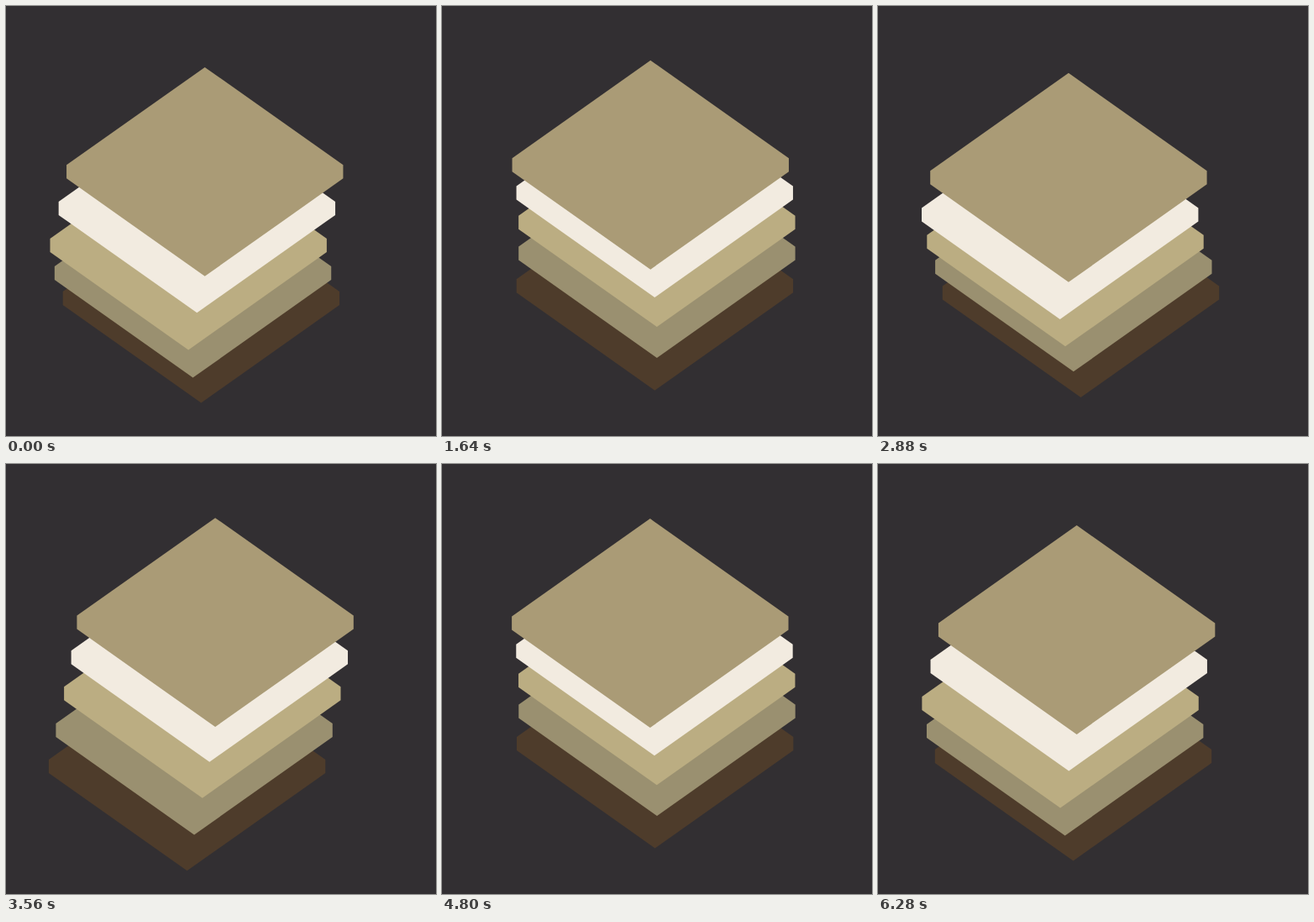
An HTML page that plays this animation: 512x512 px, repeating every 6320 ms.

```html
<!DOCTYPE html>
<html lang="en">
<head>
<meta charset="utf-8">
<title>Floating layers</title>
<style>
  html, body { margin: 0; width: 100%; height: 100%; overflow: hidden; background: #322f32; }
  svg { display: block; width: 100%; height: 100%; }
</style>
</head>
<body>
<svg id="stage" viewBox="0 0 512 512"></svg>
<script>
  const LOOP = 6320, STEP = 40;
  const SLOPE = Math.SQRT1_2;
  const HALF_WIDTH = 164.7, THICKNESS = 16;
  const REST = { x: 214.7, y: 337.4 }, GAP = 36.9, TRAVEL = 41.5;
  const PHASE = 0.56, LAG = 0.25;
  const COLORS = ['#aa9b76', '#f2ebe0', '#bbad82', '#9a9070', '#4e3c2b'];

  const stage = document.getElementById('stage');

  // Every plate is a hexagon whose lowest corner sits at the group's origin.
  const rise = HALF_WIDTH * SLOPE;
  const outline = [
    [0, 0],
    [HALF_WIDTH, -rise],
    [HALF_WIDTH, -rise - THICKNESS],
    [0, -2 * rise - THICKNESS],
    [-HALF_WIDTH, -rise - THICKNESS],
    [-HALF_WIDTH, -rise]
  ].join(' ');

  const plates = COLORS.map(color => {
    const plate = document.createElementNS('http://www.w3.org/2000/svg', 'polygon');
    plate.setAttribute('points', outline);
    plate.setAttribute('fill', color);
    stage.prepend(plate);
    return plate;
  });

  function render(ms) {
    const seconds = Math.floor((ms % LOOP) / STEP) * STEP / 1000;
    plates.forEach((plate, i) => {
      const shift = TRAVEL * Math.abs(Math.sin(seconds + PHASE - LAG * i));
      const x = REST.x + shift;
      const y = REST.y + GAP * i - shift * SLOPE;
      plate.setAttribute('transform', `translate(${x} ${y})`);
    });
  }

  const start = performance.now();
  function tick() {
    render(performance.now() - start);
    requestAnimationFrame(tick);
  }
  tick();
</script>
</body>
</html>
```
